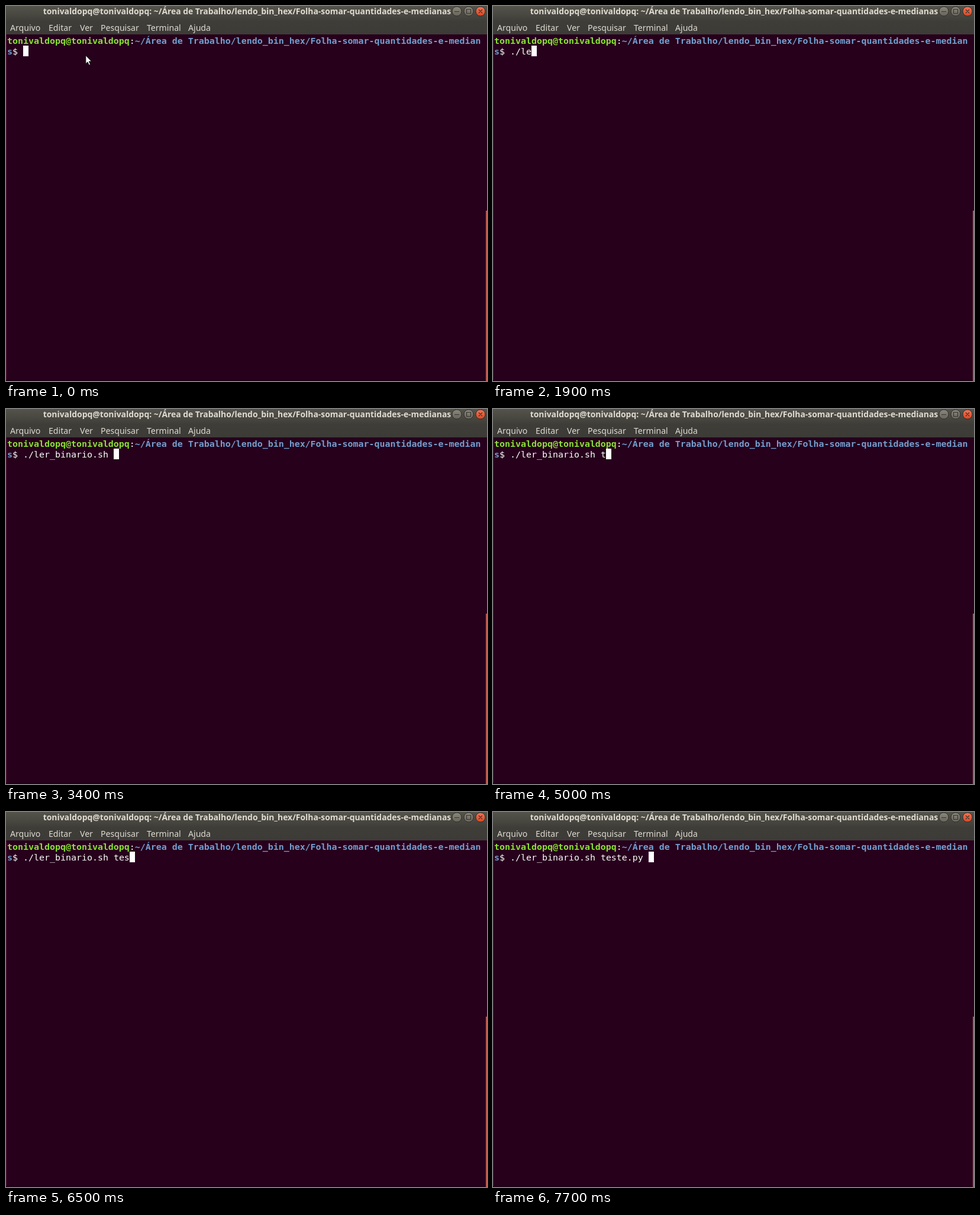
These frames come from a looping animation (813 by 634 pixels, 8000 ms). An HTML page:

```html
<!DOCTYPE html>
<html lang="pt-BR">
<head>
<meta charset="utf-8">
<title>Terminal</title>
<style>
  html, body { margin: 0; width: 100%; height: 100%; overflow: hidden; background: #27001c; }
  svg { display: block; }
  text { white-space: pre; }
  .title { font: bold 13.9px "Noto Sans", sans-serif; fill: #dfdbd2; text-anchor: middle; }
  .menu { font: 14.1px "Noto Sans", sans-serif; fill: #dfdbd2; }
  .shell { font: 14.95px "DejaVu Sans Mono", monospace; fill: #fff; }
  .user, .path { font-weight: bold; }
  .user { fill: #8ae234; }
  .path { fill: #729fcf; }
  .button { stroke: #302f2b; }
  .glyph { fill: none; stroke: #35342f; stroke-width: 1.2; }
</style>
</head>
<body>
<svg width="813" height="634" viewBox="0 0 813 634">
  <defs>
    <linearGradient id="bar" x2="0" y2="1">
      <stop stop-color="#55544b"/>
      <stop offset=".55" stop-color="#3e3d38"/>
      <stop offset="1" stop-color="#3c3b37"/>
    </linearGradient>
    <linearGradient id="grey" x2="0" y2="1">
      <stop stop-color="#8b887c"/>
      <stop offset="1" stop-color="#66645b"/>
    </linearGradient>
    <linearGradient id="red" x2="0" y2="1">
      <stop stop-color="#f37458"/>
      <stop offset="1" stop-color="#dc4620"/>
    </linearGradient>
  </defs>

  <rect width="813" height="634" fill="#27001c"/>
  <rect y="48" width="1" height="586" fill="#581538"/>
  <rect y="632" width="811" height="2" fill="#1d0015"/>
  <rect x="811" y="346" width="2" height="288" fill="#b8564a"/>

  <rect width="813" height="48" fill="url(#bar)"/>
  <text class="title" x="407.5" y="14">tonivaldopq@tonivaldopq: ~/Área de Trabalho/lendo_bin_hex/Folha-somar-quantidades-e-medianas</text>
  <g class="button">
    <circle cx="762" cy="9" r="8" fill="url(#grey)"/>
    <circle cx="782" cy="9" r="8" fill="url(#grey)"/>
    <circle cx="802" cy="9" r="8" fill="url(#red)"/>
  </g>
  <path class="glyph" d="M758 9.5h8M778.5 5.5h7v7h-7zM799 6l6 6m0-6l-6 6"/>

  <g class="menu">
    <text x="7" y="42">Arquivo</text>
    <text x="72" y="42">Editar</text>
    <text x="125" y="42">Ver</text>
    <text x="160" y="42">Pesquisar</text>
    <text x="238" y="42">Terminal</text>
    <text x="308" y="42">Ajuda</text>
  </g>

  <g class="shell">
    <text x="2" y="64"><tspan class="user">tonivaldopq@tonivaldopq</tspan>:<tspan class="path">~/Área de Trabalho/lendo_bin_hex/Folha-somar-quantidades-e-median</tspan></text>
    <text x="2" y="82"><tspan class="path">s</tspan>$</text>
    <text id="typed" x="29" y="82"></text>
  </g>
  <rect id="caret" x="29" y="67" width="9" height="18" fill="#fff"/>

  <path id="arrow" d="M134.8 83.5v14.2l3.2-3 2.3 5.2 2.3-1-2.2-5.1h4.3z" fill="#fff" stroke="#000" stroke-width=".9"/>
  <g id="beam" fill="none">
    <path d="M133.5 77.5h6M136.5 77.5v14M133.5 91.5h6" stroke="#000" stroke-width="3"/>
    <path d="M134 77.5h5M136.5 77.5v14M134 91.5h5" stroke="#fff"/>
  </g>
</svg>
<script>
  const LOOP = 8000, CELL = 9, LEFT = 29;
  const COMMAND = "./ler_binario.sh teste.py ";
  // [time in ms, characters typed so far]
  const KEYS = [
    [0, 0], [600, 1], [900, 2], [1500, 3], [1900, 4], [2100, 5], [2200, 6], [3100, 8],
    [3400, 17], [5000, 18], [5300, 19], [6500, 20], [7300, 21], [7500, 22], [7700, 26]
  ];
  const byId = id => document.getElementById(id);
  const typed = byId("typed"), caret = byId("caret"), arrow = byId("arrow"), beam = byId("beam");
  const show = (node, on) => node.setAttribute("visibility", on ? "visible" : "hidden");
  let shown = -1;

  function draw() {
    const t = performance.now() % LOOP;
    const count = KEYS.findLast(([time]) => time <= t)[1];
    if (count !== shown) {
      typed.textContent = COMMAND.slice(0, count);
      caret.setAttribute("x", LEFT + CELL * count);
      shown = count;
    }
    show(arrow, t < 100);
    show(beam, t >= 100 && t < 500);
    requestAnimationFrame(draw);
  }
  draw();
</script>
</body>
</html>
```
